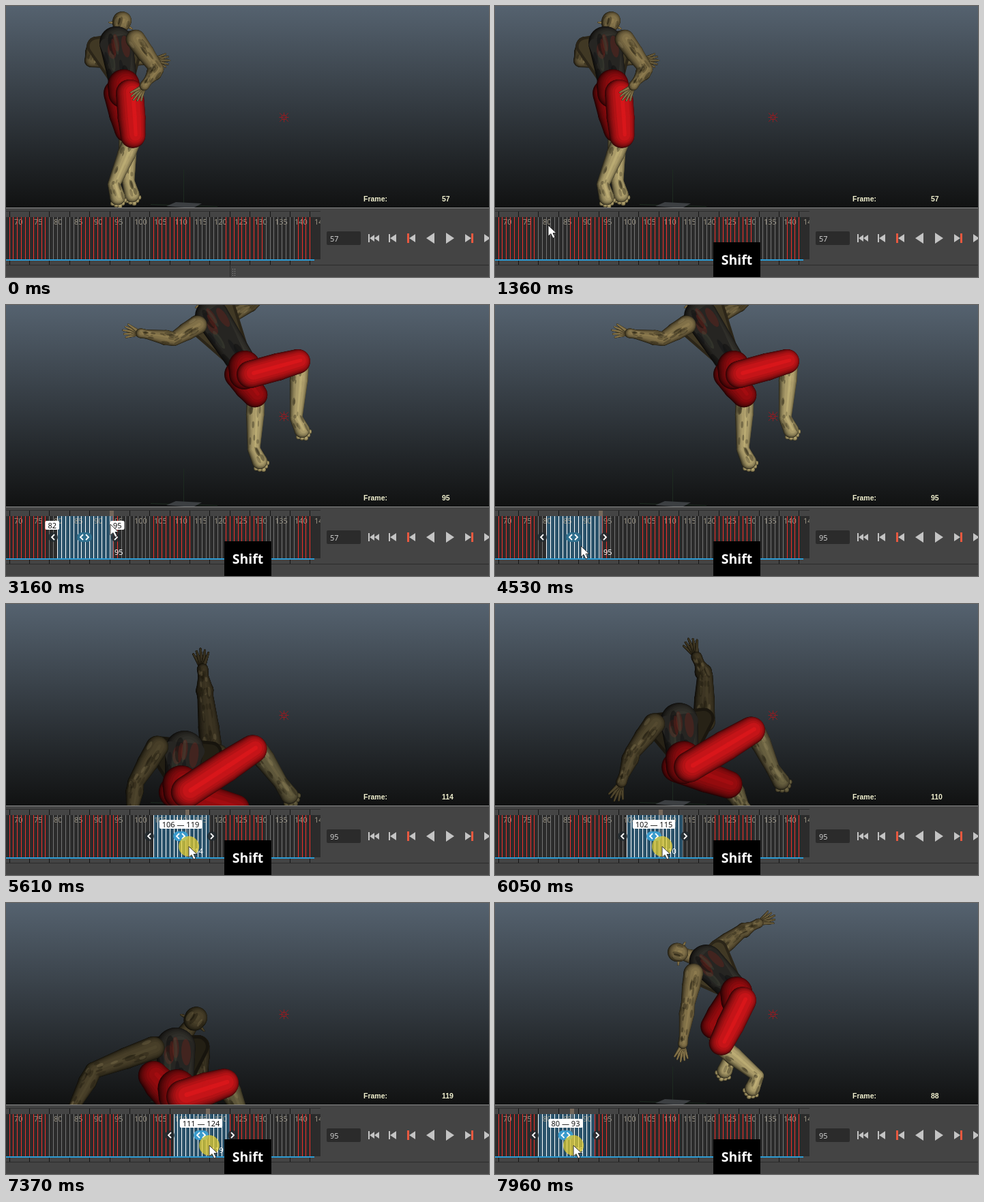
Animation, 708 px wide and 398 px high, one loop 8 s. Source, as an HTML page with a canvas:

```html
<!DOCTYPE html>
<html lang="en">
<head>
<meta charset="utf-8">
<title>Timeline scrubbing</title>
<style>
html, body { margin: 0; width: 100%; height: 100%; overflow: hidden; background: #444; }
canvas { display: block; width: 100%; height: 100%; }
</style>
</head>
<body>
<canvas width="708" height="398"></canvas>
<script>
const ctx = document.querySelector('canvas').getContext('2d');
const LOOP = 8000, STEP = 73.4;
const UI = '11px "Noto Sans", "Open Sans", sans-serif';

const mix = (a, b, u) => a + (b - a) * u;
const mixPt = (p, q, u) => [mix(p[0], q[0], u), mix(p[1], q[1], u)];
const ramp = (v, from, to) => Math.min(1, Math.max(0, (v - from) / (to - from)));
const easeOut = (u, power = 2.5) => 1 - (1 - u) ** power;
const noise = n => { const v = Math.sin(n * 127.1 + 11.7) * 43758.5453; return v - Math.floor(v); };
const cellX = f => Math.floor(5.1 + (f - 70) * 5.877);

// ---------- timing ----------
function pointerAt(ms) {
  const arrive = easeOut(ramp(ms, 150, 730)), leave = ramp(ms, 3380, 3700), drop = ramp(ms, 3600, 4460);
  return ms < 2000
    ? [mix(216, 78, arrive), mix(376, 322, arrive)]
    : [mix(153, 123, leave) + 3 * drop, mix(322, 354, drop)];
}

function stateAt(ms) {
  const t = Math.floor(ms / STEP + .6) * STEP;
  const s = { cursor: ms >= 150 && pointerAt(t), field: ms < 3380 ? 57 : 95,
    shift: ms >= 1080, selected: ms >= 1640, current: 57 };
  if (ms >= 4890) {
    const swing = 93.2 + 17.5 * Math.cos((ms - 7350) / 1560 * 2 * Math.PI);
    s.from = Math.round(ms < 5400 ? Math.max(82, swing) : swing);
    s.to = s.from + 13;
    s.current = s.from + 8;
    s.cursor = [cellX(s.current) + 5, 356];
    s.pressed = s.moving = true;
  } else if (s.selected) {
    s.from = 82;
    s.to = s.current = Math.round(82 + 13 * easeOut(ramp(ms, 2070, 2880)));
    s.pressed = ms < 3160;
    s.ends = ms < 3310;
    if (ms < 3160) s.cursor = [cellX(s.to) + 3, 322];
  }
  return s;
}

// ---------- figure ----------
// frame, shoulder half-width, facing, then head, chest, pelvis,
// two arms (elbow, wrist) and two legs (knee, ankle); the rest is derived.
const poses = [];
const pose = (...row) => poses.push(row);
pose(57, -29, .4, 169, 25, 161, 54, 172, 116, 221, 93, 208, 110, 125, 80, 205, 80, 186, 194, 158, 262, 178, 185, 179, 258);
pose(86, 22, -.8, 263, 76, 302, 82, 340, 130, 272, 140, 269, 174, 376, 76, 408, 101, 322, 203, 380, 250, 294, 190, 288, 252);
pose(89, 27, -.5, 273, 72, 312, 87, 360, 132, 288, 152, 280, 210, 351, 26, 363, 0, 334, 212, 387, 256, 330, 180, 372, 216);
pose(95, 25, .7, 293, -6, 301, 16, 349, 90, 246, 50, 206, 43, 366, -8, 338, 16, 431, 82, 425, 166, 366, 134, 363, 212);
pose(114, 40, 1, 306, 221, 261, 214, 256, 264, 190, 262, 184, 308, 292, 136, 289, 106, 366, 210, 402, 262, 340, 302, 362, 320);
pose(119, 33, .3, 276, 172, 248, 212, 250, 272, 128, 246, 98, 302, 284, 246, 275, 282, 322, 264, 342, 304, 214, 252, 250, 296);

function poseAt(frame) {
  const i = Math.max(1, poses.findIndex(p => p[0] >= frame));
  const a = poses[i - 1], b = poses[i], u = ramp(frame, a[0], b[0]);
  return a.map((v, k) => mix(v, b[k], u));
}

const SKIN = [142, 124, 80], PALE = [188, 172, 116], FAR = [112, 98, 64];
const RED = [218, 22, 26], DARK_RED = [164, 12, 16], VEST = [58, 56, 50];
const tint = (rgb, light) => `rgb(${rgb.map(v => v * light)})`;

function disc(x, y, r, color) {
  ctx.fillStyle = color;
  ctx.beginPath();
  ctx.arc(x, y, r, 0, 7);
  ctx.fill();
}

function taper(p, q, a, b, color) {
  const d = Math.hypot(q[0] - p[0], q[1] - p[1]) || 1;
  const nx = (p[1] - q[1]) / d, ny = (q[0] - p[0]) / d;
  disc(p[0], p[1], a, color);
  disc(q[0], q[1], b, color);
  ctx.beginPath();
  ctx.moveTo(p[0] + nx * a, p[1] + ny * a);
  ctx.lineTo(q[0] + nx * b, q[1] + ny * b);
  ctx.lineTo(q[0] - nx * b, q[1] - ny * b);
  ctx.lineTo(p[0] - nx * a, p[1] - ny * a);
  ctx.fill();
}

// Nested tapers, shaded like a lit cylinder.
function limb(points, radii, rgb) {
  for (let light = 0; light < 1; light += .11) {
    const k = Math.sqrt(1 - light * light), color = tint(rgb, .2 + .8 * light);
    const at = points.map(([x, y], i) => [x + light * radii[i] * .25, y - light * radii[i] * .1]);
    for (let i = 1; i < at.length; i++) taper(at[i - 1], at[i], radii[i - 1] * k, radii[i] * k, color);
  }
}

function blotches(p, q, r, seed, colors, count) {
  const along = Math.atan2(q[1] - p[1], q[0] - p[0]);
  for (let i = 0; i < count; i++) {
    const n = seed * 31 + i * 4, [x, y] = mixPt(p, q, noise(n)), side = (noise(n + 1) - .5) * r * 1.4;
    ctx.fillStyle = colors[i % colors.length];
    ctx.beginPath();
    ctx.ellipse(x - Math.sin(along) * side, y + Math.cos(along) * side,
      r * (.3 + .4 * noise(n + 2)), r * (.1 + .15 * noise(n + 3)), along, 0, 7);
    ctx.fill();
  }
}

function skin(points, radii, rgb, seed) {
  limb(points, radii, rgb);
  for (let i = 1; i < points.length; i++)
    blotches(points[i - 1], points[i], radii[i], seed + i, ['#16120a55', '#1a160b44', '#d0bf8426'], 7);
}

// End points spread around a direction.
function fan(root, angle, length, spread, count) {
  return Array.from({ length: count }, (_, i) => {
    const u = i / (count - 1) - .5, a = angle + u * spread, l = length * (1 - Math.abs(u) * .3);
    return [root[0] + Math.cos(a) * l, root[1] + Math.sin(a) * l];
  });
}

function arm(shoulder, elbow, wrist, s, rgb, seed) {
  const angle = Math.atan2(wrist[1] - elbow[1], wrist[0] - elbow[0]);
  const palm = [wrist[0] + Math.cos(angle) * 9 * s, wrist[1] + Math.sin(angle) * 9 * s];
  for (const end of fan(palm, angle, 26 * s, .9, 5)) limb([palm, end], [3.2 * s, 1.1 * s], rgb);
  skin([shoulder, mixPt(shoulder, elbow, .45), elbow, mixPt(elbow, wrist, .3), wrist, palm],
    [14, 13, 10, 11, 6.5, 7].map(r => r * s), rgb, seed);
}

function shin(knee, ankle, facing, s, rgb, seed) {
  const angle = Math.atan2(32, facing * 22);
  const ball = [ankle[0] + Math.cos(angle) * 20 * s, ankle[1] + Math.sin(angle) * 20 * s];
  for (const toe of fan(ankle, angle, 33 * s, .65, 5)) limb([ball, toe], [5 * s, 3.4 * s], rgb);
  skin([knee, mixPt(knee, ankle, .35), ankle, ball], [13, 13, 9, 11].map(r => r * s), rgb, seed);
}

function thigh(hip, knee, s, rgb) {
  limb([hip, mixPt(hip, knee, .55), mixPt(hip, knee, .95)], [20 * s, 20 * s, 18 * s], rgb);
}

function head(center, chest, s, rgb) {
  limb([mixPt(center, chest, .8), center], [12 * s, 8 * s], rgb);
  const axis = Math.atan2(center[1] - chest[1], center[0] - chest[0]);
  for (const side of [-1, 1])
    limb([center, fan(center, axis + side * 1.8, 21 * s, 0, 2)[0]], [5 * s, .8 * s], rgb);
  const [crown] = fan(center, axis, 4 * s, 0, 2);
  skin([center, crown], [13 * s, 13.5 * s], rgb, 3);
}

function hull(points, width, color) {
  ctx.fillStyle = ctx.strokeStyle = color;
  ctx.lineWidth = width;
  ctx.lineJoin = 'round';
  ctx.beginPath();
  points.forEach(p => ctx.lineTo(p[0], p[1]));
  ctx.closePath();
  ctx.fill();
  ctx.stroke();
}

function figure(frame) {
  const [, span, facing, ...xy] = poseAt(frame);
  const s = 1 + .2 * ramp(frame, 95, 119), dim = 1 - .45 * ramp(frame, 95, 112);
  const [skull, chest, pelvis, elbowA, wristA, elbowB, wristB, kneeA, ankleA, kneeB, ankleB] =
    Array.from({ length: 11 }, (_, i) => [xy[i * 2], xy[i * 2 + 1]]);
  const spine = Math.atan2(pelvis[1] - chest[1], pelvis[0] - chest[0]);
  const shoulder = side => [chest[0] + Math.sin(spine) * span * side, chest[1] - Math.cos(spine) * span * side];
  const hip = side => [pelvis[0] + side * 9, pelvis[1] + 12];
  const dimmed = rgb => rgb.map(v => v * dim);
  const near = shoulder(-1), far = shoulder(1);

  arm(far, elbowB, wristB, s, dimmed(FAR), 21);
  head(skull, chest, s, dimmed(SKIN));
  shin(kneeB, ankleB, facing, s, dimmed(PALE), 40);
  shin(kneeA, ankleA, facing, s, dimmed(PALE), 50);

  hull([near, far, pelvis], 28 * s, tint(dimmed(SKIN), .3));
  hull([near, far, pelvis], 20 * s, tint(dimmed(SKIN), .45));
  limb([chest, pelvis], [24 * s, 20 * s], VEST);
  hull([mixPt(chest, near, .5), mixPt(chest, far, .5), pelvis], 18 * s, '#262522');
  blotches(chest, pelvis, 26 * s, 7, ['#6d221b66', '#11131677', '#4b503f55', '#0d0d0d77'], 14);

  thigh(hip(-1), kneeB, s, DARK_RED);
  limb([pelvis, hip(0)], [23 * s, 22 * s], DARK_RED);
  thigh(hip(1), kneeA, s, RED);
  arm(near, elbowA, wristA, s, dimmed(SKIN), 12);
}

// ---------- interface ----------
function rect(x, y, w, h, color, r = 0) {
  ctx.fillStyle = color;
  ctx.beginPath();
  ctx.roundRect(x, y, w, h, r);
  ctx.fill();
}

function text(str, x, y, color, font = UI, align = 'left') {
  ctx.font = font;
  ctx.textAlign = align;
  ctx.fillStyle = color;
  ctx.fillText(str, x, y);
}

function lines(color, width, ...paths) {
  ctx.strokeStyle = color;
  ctx.lineWidth = width;
  ctx.lineJoin = 'miter';
  ctx.beginPath();
  for (const p of paths) for (let i = 0; i < p.length; i += 2) ctx[i ? 'lineTo' : 'moveTo'](p[i], p[i + 1]);
  ctx.stroke();
}

function poly(color, ...p) {
  ctx.fillStyle = color;
  ctx.beginPath();
  for (let i = 0; i < p.length; i += 2) ctx.lineTo(p[i], p[i + 1]);
  ctx.fill();
}

const sky = ctx.createLinearGradient(0, 0, 0, 296);
sky.addColorStop(0, '#55626f');
sky.addColorStop(1, '#111212');

function locator(x, y) {
  ctx.strokeStyle = '#941b20';
  ctx.lineWidth = 1;
  ctx.strokeRect(x - 3, y - 3, 6, 6);
  for (let i = 0; i < 8; i++) {
    const c = Math.cos(i * Math.PI / 4), d = Math.sin(i * Math.PI / 4), inner = i % 2 ? 5 : 1, outer = i % 2 ? 9 : 7;
    lines('#941b20', 1, [x + c * inner, y + d * inner, x + c * outer, y + d * outer]);
  }
}

function viewport(s) {
  rect(0, 0, 708, 296, sky);
  ctx.save();
  ctx.beginPath();
  ctx.rect(0, 0, 708, 296);
  ctx.clip();
  lines('#1d2a20', 1, [260.5, 240, 260.5, 290], [212, 291.5, 310, 294.5]);
  poly('#3c3f42', 235, 294, 249, 288, 287, 290, 274, 297);
  figure(s.current);
  locator(407.5, 163.5);
  ctx.restore();
  const bold = 'bold 10.5px "Liberation Sans", Arial, sans-serif';
  text('Frame:', 524, 287, '#f1f0cf', bold);
  text(s.current, 639, 287, '#f1f0cf', bold);
}

const keyed = f => (f - 70) % 18 < 10;

function chevron(x, dir, size = 4) {
  lines('#fff', 1.8, [x - dir * size / 2, 341 - size, x + dir * size / 2, 341, x - dir * size / 2, 341 + size]);
}

function tag(str, x, anchor) {
  ctx.font = UI;
  const w = ctx.measureText(str).width + 8, left = x - w * anchor;
  rect(left, 317, w, 13, '#fff', 2);
  text(str, left + 4, 328, '#111');
}

function selection(s, left, right) {
  const x = cellX(s.current), mid = (left + right) / 2 - 1;
  rect(x, 302, 6, 8, '#75685c');
  rect(x, 310, 6, 62, '#8b8b8b66');
  text(s.current, x + 7, 367, '#fff');
  for (const [hx, dir] of [[left - 6, -1], [right + 4, 1]]) {
    disc(hx, 341, 7, '#20292ecc');
    chevron(hx, dir);
  }
  rect(mid - 11, 334, 22, 14, s.moving ? '#3b9bcc' : '#2f6f8d', 7);
  for (const dir of [-1, 1]) chevron(mid + dir * 4, dir);
  if (s.ends) {
    tag(s.from, left + 3, 1);
    tag(s.to, cellX(s.to) + 1, 0);
  }
  if (s.moving) tag(s.from + ' — ' + s.to, mid, .5);
}

function timeline(s) {
  rect(0, 296, 708, 102, '#444');
  rect(0, 296, 708, 1, '#8b8b8b');
  rect(0, 301, 461, 1, '#2d2d2d');
  rect(0, 310, 461, 62, '#2b2b2b');
  rect(0, 380, 708, 1, '#2b2b2b');
  rect(328, 381, 1, 17, '#2b2b2b');
  for (let i = 0; i < 8; i++) rect(332 + i % 2 * 3, 386 + (i >> 1) * 3, 1, 1, '#999');
  ctx.save();
  ctx.beginPath();
  ctx.rect(0, 296, 461, 102);
  ctx.clip();
  const left = s.selected && cellX(s.from), right = s.selected && cellX(s.to + 1);
  if (s.selected) rect(left, 310, right - left, 62, '#2a526a');
  for (let f = 70; f <= 145; f++) {
    const x = cellX(f), inside = s.selected && f >= s.from && f <= s.to;
    rect(x, 310, 1, 62, inside ? '#fff' : keyed(f) ? '#f0302c' : '#747474');
    if (f % 5) continue;
    rect(x, 302, 1, 8, '#151515');
    rect(x, 374, 1, 6, '#151515');
    text(f, x + 7, 321, '#9a9484');
  }
  rect(0, 372, 452, 2, '#2c9bd3');
  if (s.selected) selection(s, left, right);
  ctx.restore();
}

function controls(s) {
  rect(470, 331, 50, 20, '#2b2b2b', 2);
  text(s.field, 475, 346, '#cfcfcf');
  const grey = '#c4c4c4', red = '#e8583f';
  const arrow = (x, dir, w, h) => poly(grey, x, 341, x - dir * w, 341 - h, x - dir * w, 341 + h);
  rect(531, 335, 2, 12, grey);
  arrow(533, -1, 7, 5);
  arrow(540, -1, 7, 5);
  rect(561, 335, 2, 12, grey);
  arrow(563, -1, 9, 6);
  rect(588, 334, 3, 14, red);
  arrow(591, -1, 9, 6);
  arrow(616, -1, 12, 8);
  arrow(657, 1, 12, 8);
  arrow(682, 1, 9, 6);
  rect(682, 334, 3, 14, red);
  arrow(710, 1, 9, 6);
}

function pointer(s) {
  if (!s.cursor) return;
  const [x, y] = s.cursor, outline = [0, 0, 0, 16, 4, 12.5, 7, 19, 10, 17.5, 7, 11.5, 12, 11.5, 0, 0];
  if (s.pressed) disc(x, y, 15, 'rgba(232,208,48,.72)');
  ctx.save();
  ctx.translate(x, y);
  poly('#fff', ...outline);
  lines('#222', .9, outline);
  ctx.restore();
}

function draw(now) {
  const s = stateAt(now % LOOP);
  viewport(s);
  timeline(s);
  controls(s);
  pointer(s);
  if (s.shift) {
    rect(320, 347, 69, 51, '#000');
    text('Shift', 354.5, 380, '#fff', 'bold 19.5px "Open Sans", "Noto Sans", sans-serif', 'center');
  }
  requestAnimationFrame(draw);
}
requestAnimationFrame(draw);
</script>
</body>
</html>
```
